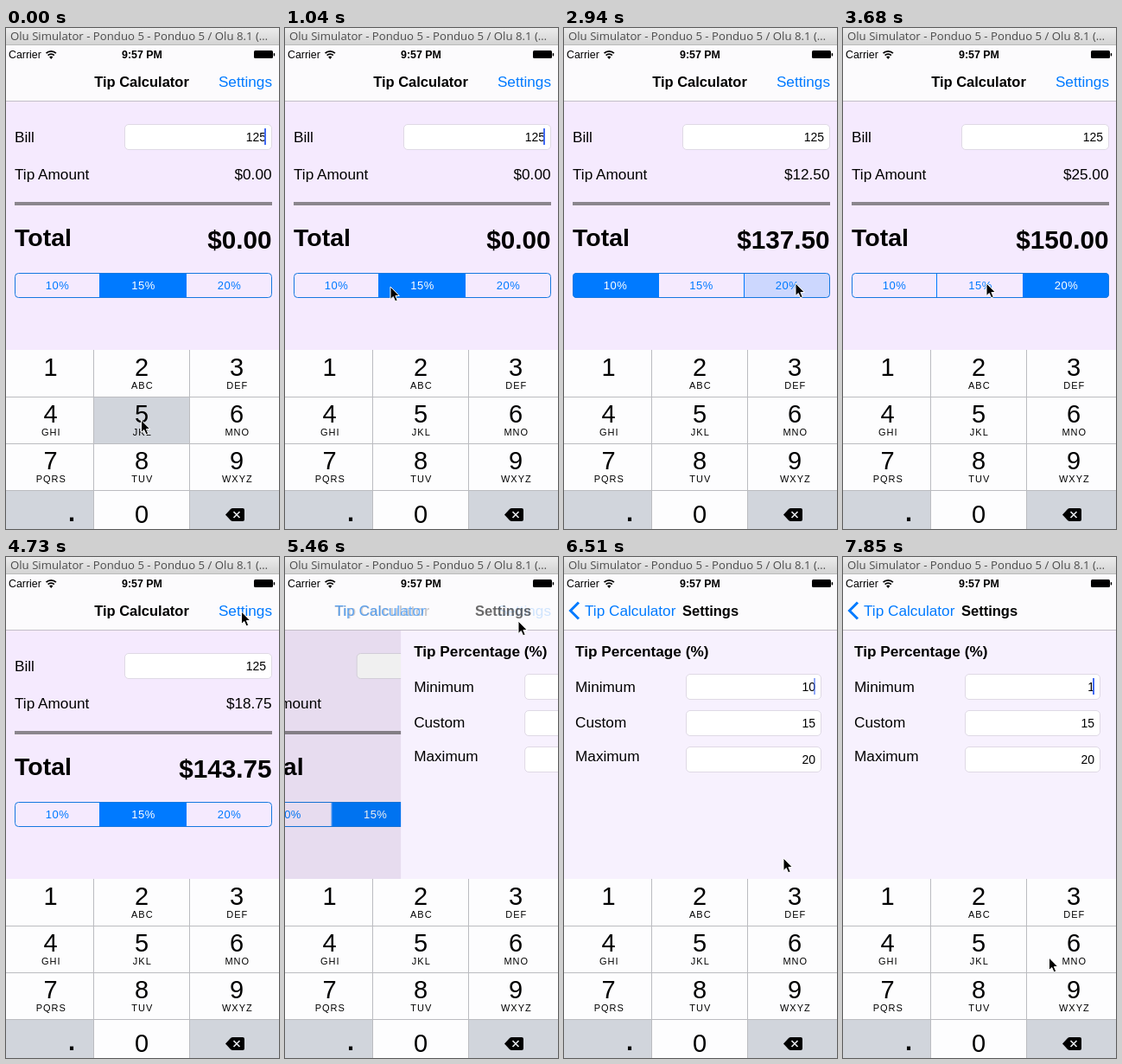
Animation of 316 by 579 pixels, one loop 7990 ms. Source, as an HTML page:

```html
<!DOCTYPE html>
<html lang="en">
<head>
<meta charset="utf-8">
<title>Tip Calculator</title>
<style>
  html, body { margin: 0; width: 100%; height: 100%; overflow: hidden; }
  svg { display: block; width: 100%; height: 100%; }
  text { font-family: "Liberation Sans", Arial, sans-serif; font-size: 17.2px; white-space: pre; }
  .blue { fill: #007aff; }
  .bold { font-weight: bold; }
  .heading { font-weight: bold; font-size: 16.5px; }
  .value { font-size: 14px; }
  .status { font-size: 12.4px; }
  .digit { font-size: 29px; }
  .letters { font-size: 11px; letter-spacing: 1px; }
  .segment { font-size: 13px; letter-spacing: .5px; }
  .total { font-size: 29.7px; font-weight: bold; }
  .window { font: 13.2px "Open Sans", sans-serif; fill: #4c4c4c; }
</style>
</head>
<body>
<svg id="stage" viewBox="0 0 316 579"></svg>
<script>
const LOOP = 7990, STEP = 148, LAST_STEP = 53;
const RATES = [10, 15, 20];

const text = (x, y, str, cls = '', anchor = 'start', id = '') =>
  `<text id="${id}" x="${x}" y="${y}" class="${cls}" text-anchor="${anchor}">${str}</text>`;
const rect = (x, y, w, h, fill, extra = '') =>
  `<rect x="${x}" y="${y}" width="${w}" height="${h}" fill="${fill}" ${extra}/>`;
const field = (x, y, w) => rect(x + .5, y + .5, w - 1, 29, '#fff', 'rx="4.5" stroke="#dfd9e5"');
const caret = (id, x, y) => rect(x, y, 2, 19, '#426bf2', `id="${id}"`);

function calculatorPage() {
  const segments = RATES.map((rate, i) =>
    rect(10 + i * 99, 283, 100, 29, '#007aff', `id="seg${i}" clip-path="url(#round)"`) +
    text(59.5 + i * 99.5, 302, rate + '%', 'segment', 'middle', 'rate' + i)).join('');
  return `<g id="calculator">
    ${rect(0, 85, 316, 287, '#f5eafe')}
    ${text(10, 132, 'Bill')} ${field(137, 111, 171)}
    ${text(301, 131, '125', 'value', 'end')} ${caret('billCaret', 299, 116)}
    ${text(10, 175, 'Tip Amount')} ${text(307.5, 175, '', '', 'end', 'tip')}
    ${rect(10, 201, 298, 4, '#8b868d')}
    <text x="10" y="252" class="bold" style="font-size:28.5px">Total</text>
    ${text(307.5, 255, '', 'total', 'end', 'total')}
    ${segments}
    <path d="M108.5 283v29M208.5 283v29" stroke="#007aff"/>
    ${rect(10.5, 283.5, 297, 28, 'none', 'rx="4" stroke="#1578e0"')}
    ${rect(0, 85, 316, 287, '#000', 'id="dim"')}
  </g>`;
}

function settingsPage() {
  const rows = [['Minimum', 156, 135, 10], ['Custom', 197, 177, 15], ['Maximum', 236, 219, 20]];
  return `<g id="settings">
    ${rect(-2, 85, 320, 287, '#f7f1fe')}
    ${text(13, 115, 'Tip Percentage (%)', 'bold')}
    ${rows.map(([name, y, top, n], i) => text(13, y, name) + field(141, top, 157) +
      text(291, top + 20, n, 'value', 'end', 'limit' + i)).join('')}
    ${caret('limitCaret', 289, 140)}
  </g>`;
}

function header() {
  return rect(0, 0, 316, 20, 'url(#chrome)') + rect(0, 19, 316, 1, '#bbb') +
    text(5, 14, 'Olu Simulator - Ponduo 5 - Ponduo 5 / Olu 8.1 (…', 'window') +
    rect(0, 20, 316, 64, '#fcfbfd') + rect(0, 84, 316, 1, '#c3bec7') +
    text(3, 35, 'Carrier', 'status') +
    `<g fill="none" stroke="#000" stroke-width="1.7">
      <path d="M46.5 29.2a8 8 0 0 1 11.4 0M48.6 31.6a5 5 0 0 1 7.2 0"/></g>
    <path d="M52.2 36l-2.1-2.4a3 3 0 0 1 4.2 0z"/>` +
    text(157.5, 35, '9:57 PM', 'status bold', 'middle') +
    rect(287, 26, 22, 9, '#000', 'rx="1.5"') + rect(309.7, 29, 1.5, 3.5, '#000', 'rx=".7"') +
    text(157, 68, 'Tip Calculator', 'heading', 'middle', 'oldTitle') +
    text(308, 68, 'Settings', 'blue', 'end', 'settingsLink') +
    `<path id="chevron" d="M17 52.5L7.5 62l9.500 9.500" fill="none" stroke="#007aff" stroke-width="3"/>` +
    text(24, 68, 'Tip Calculator', 'blue', 'start', 'back') +
    text(137, 68, 'Settings', 'heading', 'start', 'newTitle');
}

function keyboard() {
  const letters = ['', 'ABC', 'DEF', 'GHI', 'JKL', 'MNO', 'PQRS', 'TUV', 'WXYZ'];
  const centers = [51.5, 157, 267];
  const keys = letters.map((label, i) => {
    const x = centers[i % 3], y = 402 + 54 * Math.floor(i / 3);
    return text(x, y, i + 1, 'digit', 'middle') + text(x + .8, y + 15, label, 'letters', 'middle');
  }).join('');
  return rect(0, 372, 316, 207, '#fdfdfe') +
    rect(0, 534, 101, 45, '#d1d5dc') +
    rect(212, 534, 104, 45, '#d1d5dc', 'id="deleteKey"') +
    rect(102, 427, 110, 53, '#d1d5dc', 'id="fiveKey"') +
    `<path d="M0 426.500H316M0 480.500H316M0 534.500H316M101.500 372V579M212.500 372V579" stroke="#bbbcc0"/>` +
    keys + text(157, 572, '0', 'digit', 'middle') + text(76, 570, '.', 'digit bold', 'middle') +
    `<path d="M254 562.500l6-6.500q1-1 2.500-1H274q2 0 2 2v11q0 2-2 2h-11.500q-1.500 0-2.500-1z"/>
    <path d="M263.500 559l7 7m0-7l-7 7" stroke="#e4e6ea" stroke-width="1.700"/>`;
}

document.getElementById('stage').innerHTML = `
  <defs>
    <linearGradient id="chrome" x2="0" y2="1">
      <stop stop-color="#ececec"/><stop offset="1" stop-color="#d2d2d2"/>
    </linearGradient>
    <clipPath id="round"><rect x="10" y="283" width="298" height="29" rx="4.500"/></clipPath>
  </defs>
  ${calculatorPage()}${settingsPage()}${header()}${keyboard()}
  <path id="cursor" d="M0 0V14.500l3.300-3 2.300 5.300 2.600-1.100-2.300-5.200H10.300z" stroke="#fff" stroke-width="1"/>`;

const el = Object.fromEntries([...document.querySelectorAll('[id]')].map(e => [e.id, e]));
const set = (id, name, value) => el[id].setAttribute(name, value);
const fade = (id, value) => set(id, 'opacity', value);
const shift = (id, x, y = 0) => set(id, 'transform', `translate(${x} ${y})`);

// Pointer stops: step, x, y
const pointerPath = [
  [0, 156.5, 453], [1, 156, 450], [5, 128, 299], [7, 122, 299], [11, 62, 297], [15, 62, 297],
  [18, 300, 297], [20, 268, 295], [22, 268, 296], [25, 166, 295], [28, 166, 295],
  [32, 272.5, 63], [36, 272.5, 63], [38, 267.5, 85], [43, 254, 348], [44, 254, 348],
  [47, 269, 551], [51, 269, 551], [53, 238.5, 463]
];
function pointerAt(step) {
  const i = Math.max(1, pointerPath.findIndex(stop => stop[0] >= step));
  const [s0, x0, y0] = pointerPath[i - 1], [s1, x1, y1] = pointerPath[i];
  const u = (step - s0) / (s1 - s0), e = u * u * (3 - 2 * u);
  return [x0 + (x1 - x0) * e, y0 + (y1 - y0) * e];
}

// Each tap: segment index, step of press; the amount follows, then the selection
const taps = [[0, 13], [2, 20], [1, 27]];

function drawCalculator(step) {
  let selected = 1, pressed = -1, rate = 0;
  for (const [index, start] of taps) {
    if (step < start) continue;
    pressed = step < start + 2 ? index : -1;
    if (step > start) rate = RATES[index];
    if (step > start + 1) selected = index;
  }
  const tip = 125 * rate / 100;
  el.tip.textContent = '$' + tip.toFixed(2);
  el.total.textContent = '$' + (rate ? 125 + tip : 0).toFixed(2);
  RATES.forEach((_, i) => {
    fade('seg' + i, i === selected ? 1 : i === pressed ? .17 : 0);
    set('rate' + i, 'fill', i === selected ? '#fff' : '#007aff');
  });
}

function drawPush(step) {
  const x = Math.max(0, step - 36) * 1.92;
  const left = (1 + x) * Math.exp(-x);
  shift('settings', 318 * left);
  shift('calculator', -95 * (1 - left));
  shift('oldTitle', -78 * (1 - left));
  shift('back', 78 * left);
  shift('newTitle', 194 * left);
  fade('dim', .1 * (1 - left));
  fade('oldTitle', left ** 2);
  fade('settingsLink', step < 36 ? 1 : left * .4);
  fade('back', 1 - left);
  fade('newTitle', 1 - left);
  fade('chevron', (1 - left) ** 12);
}

function draw(time) {
  // The screen refreshes in even steps rather than continuously.
  const step = Math.min(LAST_STEP, Math.floor((time % LOOP + 20) / STEP));
  const deleted = step >= 49;
  const phase = step * STEP % 1000;
  const blink = Math.min(1, Math.max(0, (600 - phase) / 150));
  drawCalculator(step);
  drawPush(step);
  fade('billCaret', blink);
  fade('limitCaret', deleted ? 1 : blink);
  el.limit0.textContent = deleted ? '1' : '10';
  fade('fiveKey', step < 1 ? 1 : 0);
  set('deleteKey', 'fill', step === 48 || step === 49 ? '#fdfdfe' : '#d1d5dc');
  shift('cursor', ...pointerAt(step));
}

const start = performance.now();
function tick() {
  draw(performance.now() - start);
  requestAnimationFrame(tick);
}
tick();
</script>
</body>
</html>
```
